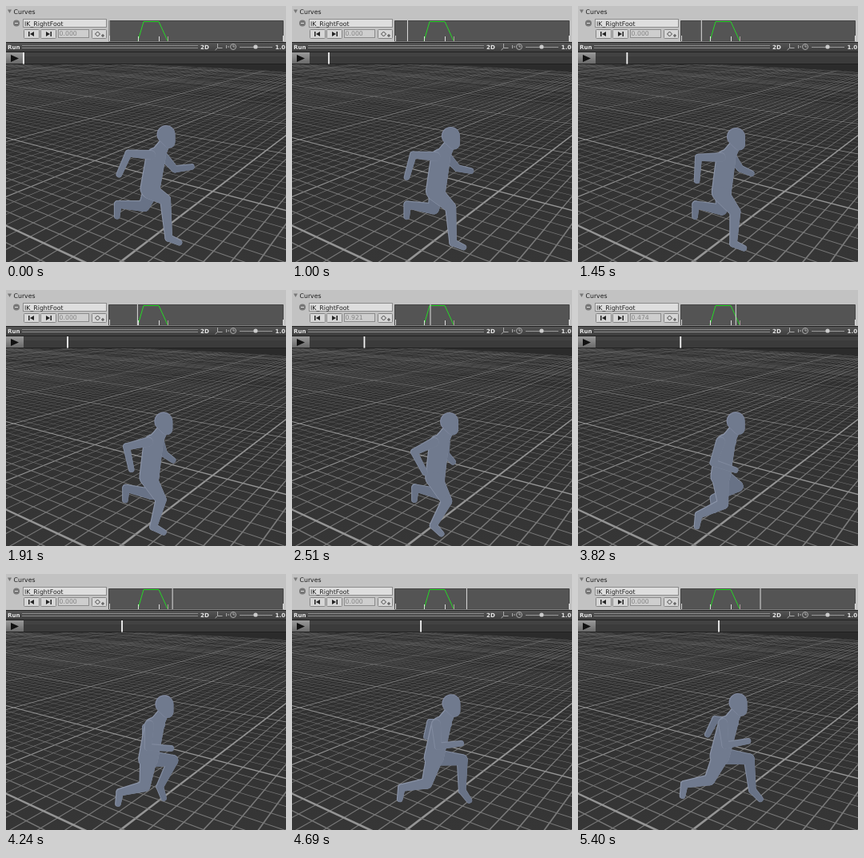
These frames come from a looping animation (350 by 320 pixels, 5.66 s). An HTML page with a canvas:

```html
<!DOCTYPE html>
<html lang="en">
<head>
<meta charset="utf-8">
<title>Run preview</title>
<style>
  html, body { margin: 0; width: 100%; height: 100%; overflow: hidden; background: #333; }
  canvas, svg { position: absolute; left: 0; top: 0; width: 350px; height: 320px; }
  text { font: 7.8px "DejaVu Sans", sans-serif; fill: #1c1c1c; }
  .bold { font-size: 7.1px; font-weight: 700; fill: #e6e6e6; }
  .button { fill: #d6d6d6; stroke: #858585; }
  .field { fill: #dedede; stroke: #8c8c8c; }
  .icon { fill: none; stroke: #aaa; }
</style>
</head>
<body>
<canvas id="view" width="350" height="320"></canvas>
<svg viewBox="0 0 350 320">
  <defs>
    <linearGradient id="bar" x2="0" y2="1">
      <stop stop-color="#575757"/><stop offset="1" stop-color="#3c3c3c"/>
    </linearGradient>
    <linearGradient id="key" x2="0" y2="1">
      <stop stop-color="#9a9a9a"/><stop offset="1" stop-color="#686868"/>
    </linearGradient>
  </defs>

  <!-- Curve inspector -->
  <path fill="#c2c2c2" d="M0 0h350v45H0z"/>
  <path fill="#777" d="M2 4.500h5l-2.500 4.500z"/>
  <text x="9.500" y="9.500">Curves</text>
  <circle cx="13" cy="21.500" r="4" fill="#777"/>
  <path stroke="#ddd" d="M11 21.500h4"/>
  <rect class="field" x="21.500" y="16.500" width="104" height="10"/>
  <text x="23" y="24.500">IK_RightFoot</text>
  <rect class="button" x="22.500" y="29.500" width="19" height="11" rx="1"/>
  <rect class="button" x="43.500" y="29.500" width="19" height="11" rx="1"/>
  <path fill="#222" d="M28 32h1.500v6H28zM35 32v6l-5-3zM50 32v6l5-3zM55.500 32H57v6h-1.500z"/>
  <rect class="field" x="65.500" y="29.500" width="38" height="10" fill-opacity=".4"/>
  <text id="value" x="66.500" y="37" style="fill:#858585">0.000</text>
  <rect class="button" x="107.500" y="29.500" width="18" height="11" rx="1"/>
  <path fill="none" stroke="#444" d="M111.500 35l3-3 3 3-3 3zM119 37h4M121 35v4"/>
  <path fill="#545454" stroke="#444" d="M128.500 18.500h218v25.500h-218z"/>
  <path fill="none" stroke="#26d926" d="M165 43.500L172 19.500H191L202 43.500"/>
  <path stroke="#ddd" d="M129.500 37v7M165.500 38v6M191.500 38v6M346.500 37v7"/>
  <path stroke="#a99" d="M202.500 38v6"/>
  <rect id="curveCursor" y="18" width="1" height="26" fill="#ddd"/>

  <!-- Preview toolbar -->
  <path fill="url(#bar)" d="M0 45h350v12.500H0z"/>
  <path stroke="#222" d="M0 45.500h350M0 57.500h350"/>
  <text class="bold" x="2" y="54">Run</text>
  <path stroke="#8b8b8b" d="M20 49.500h220M20 52.500h220"/>
  <text class="bold" x="243" y="54">2D</text>
  <path class="icon" d="M264.500 47v5.500h6M264.500 52.500l-3 2.500M275.500 49v4M278 50v2"/>
  <circle class="icon" cx="284" cy="51" r="3.500"/>
  <path class="icon" d="M284 48.500V51h2"/>
  <path stroke="#999" d="M292 51.500h41"/>
  <circle cx="312" cy="51" r="2.600" fill="#ccc"/>
  <text class="bold" x="336.500" y="54">1.0</text>

  <!-- Timeline -->
  <path fill="#3b3b3b" d="M0 58h350v15H0z"/>
  <path fill="#424242" d="M22 58h328v5H22z"/>
  <path fill="url(#key)" d="M0 58h22v14.500H0z"/>
  <path fill="#111" d="M6 61v9l10-4.500z"/>
  <path stroke="#202020" d="M0 72.500h350"/>
  <rect id="timeCursor" y="58" width="1.800" height="14.500" fill="#f4f4f4"/>
</svg>
<script>
const LOOP = 5660, FIRST = 22, LAST = 176;
const byId = id => document.getElementById(id);
const ctx = byId('view').getContext('2d');

const clamp = (v, lo = 0, hi = 1) => Math.max(lo, Math.min(hi, v));
const step = (v, from, to) => {
  const u = clamp((v - from) / (to - from));
  return u * u * (3 - 2 * u);
};

// The playhead is dragged by hand: [time in ms, x], straight between the points.
const drag = [
  [80, FIRST], [190, 25], [490, 25], [1000, 46], [1910, 77], [3340, 109], [4240, 145], [5110, LAST]
];

function playheadAt(time) {
  let x = FIRST;
  for (let i = 1; i < drag.length; i++) {
    const [t0, x0] = drag[i - 1], [t1, x1] = drag[i];
    x += (x1 - x0) * clamp((time - t0) / (t1 - t0));
  }
  return x;
}

// Chain of joints from bones given as [angle, length]; 0 points ahead, 90 down.
function chain(root, ...bones) {
  const joints = [root];
  for (const [angle, length] of bones) {
    const [x, y] = joints[joints.length - 1], a = angle * Math.PI / 180;
    joints.push([x + length * Math.cos(a), y + length * Math.sin(a)]);
  }
  return joints;
}

// Half a stride: p runs from 0 (near leg ahead) to 1 (far leg ahead).
function stride(p) {
  const dip = Math.sin(Math.PI * p);
  const crouch = Math.exp(-(((p - 0.56) / 0.1) ** 2));
  const head = [201.5 - 3.5 * dip, 161 + 4 * dip];
  const hip = [180 - 3 * p, 228 - p + 6.5 * dip];
  const from = ([x, y], dx, dy) => [x + dx, y + dy];
  return {
    head, hip, chest: from(head, -14.5, 28),
    nearLeg: chain(from(hip, 0, 3),
      [30 + 85 * p - 24 * crouch, 22 + 8 * p + 5 * dip],
      [85 + 85 * step(p, 0.1, 0.9), 48 - 16 * step(p, 0, 0.5) + 8 * crouch],
      [24 + 75 * step(p, 0.3, 0.7), 14.5]),
    farLeg: chain(from(hip, 2, 0),
      [113 - 72 * p - 52 * step(p, 0.55, 0.8) + 18 * step(p, 0.8, 1), 24 - 7 * p + 18 * step(p, 0.55, 1)],
      [184 + 10 * dip - 100 * step(p, 0.5, 0.95), 33 + 6 * step(p, 0.5, 1) - 8 * crouch],
      [94 - 46 * step(p, 0.6, 1), 15]),
    nearArm: chain(from(head, -20.5, 25),
      [184 - 100 * step(p, 0.15, 0.95), 28],
      [114 - 124 * step(p, 0, 1), 29]),
    farArm: chain(from(head, -6.5, 25),
      [48 + 142 * step(p, 0.15, 1), 24 - 9 * dip],
      [125 * p - 8, 21 - 8 * dip])
  };
}

// Tapered capsule around two circles.
function capsule([ax, ay], [bx, by], ra, rb) {
  const angle = Math.atan2(by - ay, bx - ax);
  const ratio = (ra - rb) / (Math.hypot(bx - ax, by - ay) || 1);
  const side = Math.acos(clamp(ratio, -1, 1));
  ctx.beginPath();
  ctx.arc(ax, ay, ra, angle + side, angle - side);
  ctx.arc(bx, by, rb, angle - side, angle + side);
  ctx.fill();
}

// Limbs drawn as one silhouette with a lit upper-left rim.
function drawLimbs(limbs, color, rim) {
  for (const [fill, shift, inset] of [[rim, 0, 0], [color, 0.5, 0.6]]) {
    ctx.fillStyle = fill;
    for (const { joints, radii } of limbs) {
      const moved = joints.map(([x, y]) => [x + shift, y + shift]);
      for (let i = 1; i < moved.length; i++) {
        capsule(moved[i - 1], moved[i], radii[i - 1] - inset, radii[i] - inset);
      }
    }
  }
}

function drawFigure(p) {
  const { head, chest, hip, nearLeg, farLeg, nearArm, farArm } = stride(p);
  const [hx, hy] = head;
  const arm = [6, 4.5, 3.8], leg = [10.5, 7, 4.8, 3.8];
  drawLimbs([{ joints: farArm, radii: arm }, { joints: farLeg, radii: leg }], '#687286', '#838da1');
  drawLimbs([
    { joints: [[hx - 1, hy + 7], [chest[0] + 3, chest[1] - 4]], radii: [6.5, 9.5] },
    { joints: [chest, hip], radii: [12.5, 12.5] },
    { joints: nearLeg, radii: leg }
  ], '#707a8e', '#8b94a8');
  drawLimbs([{ joints: [[hx - 1.5, hy - 0.5], [hx + 2.5, hy + 9]], radii: [11.5, 7.5] }], '#707a8e', '#8189a0');
  drawLimbs([{ joints: nearArm, radii: arm }], '#707a8e', '#808a9e');
}

// Perspective floor: every line is a thin wedge towards its vanishing point.
function makeFloor() {
  const floor = document.createElement('canvas');
  floor.width = 350;
  floor.height = 320;
  const g = floor.getContext('2d');
  const horizon = 24, bottom = 320;
  const shade = g.createLinearGradient(0, 73, 0, 320);
  shade.addColorStop(0, '#2e2e2e');
  shade.addColorStop(1, '#363636');
  g.fillStyle = shade;
  g.fillRect(0, 0, 350, 320);

  function family(vanishX, originX, gap) {
    for (let i = -100; i <= 100; i++) {
      const major = i % 10 === 0;
      const x = originX + i * gap, half = gap * (major ? 0.065 : 0.032);
      g.fillStyle = major ? '#959595' : '#7a7a7a';
      g.beginPath();
      g.moveTo(vanishX - 0.25, horizon);
      g.lineTo(vanishX + 0.25, horizon);
      g.lineTo(x + half, bottom);
      g.lineTo(x - half, bottom);
      g.fill();
    }
  }
  family(530, 143, 34.5);
  family(-540, 98, 50);

  g.fillStyle = '#2b2b2b';
  g.beginPath();
  g.moveTo(180, 73);
  g.lineTo(350, 82);
  g.lineTo(350, 73);
  g.fill();
  return floor;
}

const curveValue = x => Math.min(clamp((x - 165) / 8.7), clamp((203 - x) / 12));

const floor = makeFloor();
const start = performance.now();

function frame() {
  const x = playheadAt((performance.now() - start) % LOOP);
  const curveX = 129 + (x - FIRST) * 0.643;
  ctx.drawImage(floor, 0, 0);
  drawFigure((x - FIRST) / (LAST - FIRST));
  byId('timeCursor').setAttribute('x', x - 0.9);
  byId('curveCursor').setAttribute('x', curveX - 0.5);
  byId('value').textContent = curveValue(curveX).toFixed(3);
  requestAnimationFrame(frame);
}
frame();
</script>
</body>
</html>
```
